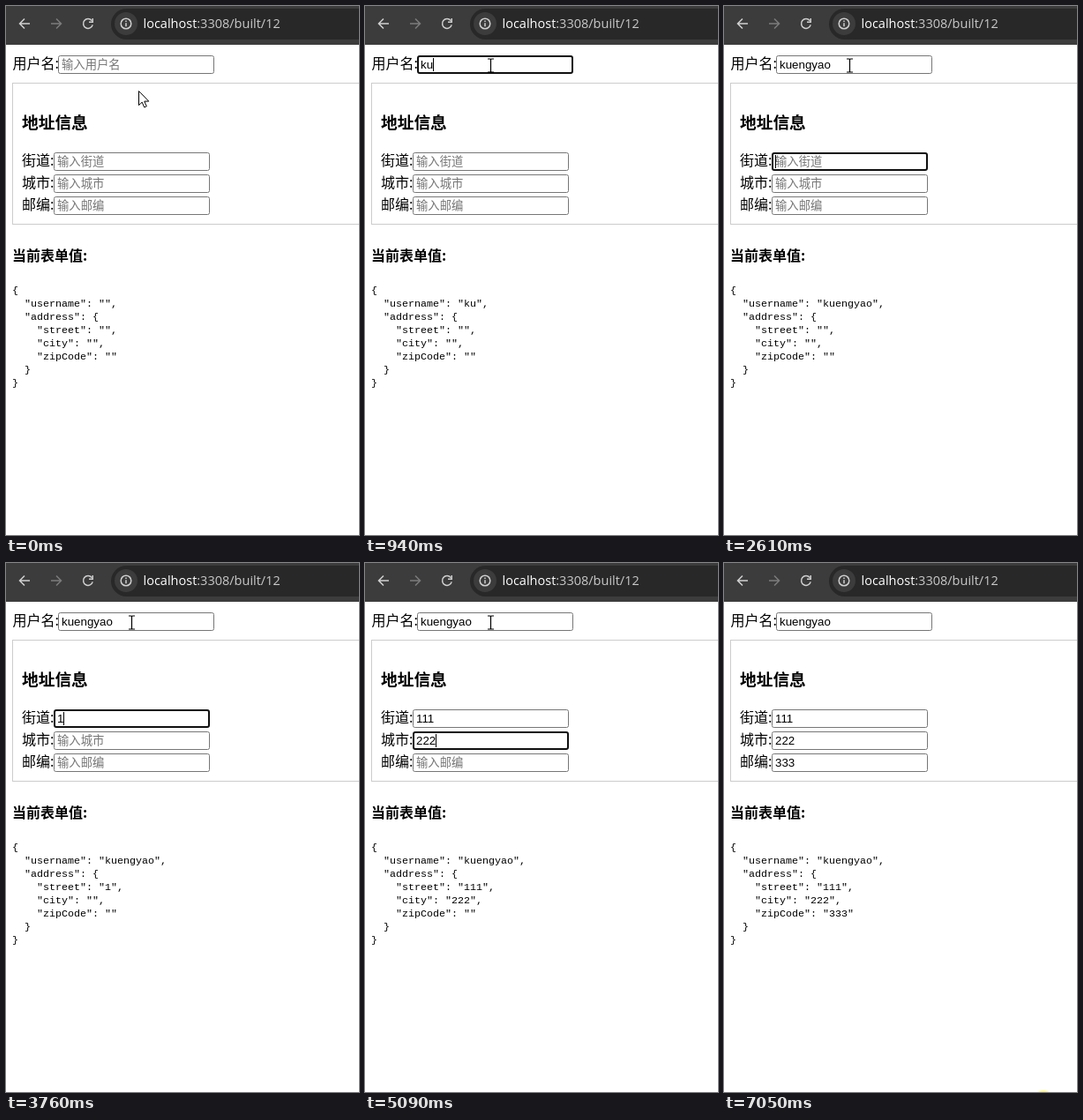
An HTML page that plays this animation: 400x600 px, repeating every 7510 ms.

```html
<!DOCTYPE html>
<html lang="zh">
<head>
<meta charset="utf-8">
<title>Form demo</title>
<style>
  html, body { margin: 0; width: 100%; height: 100%; overflow: hidden; background: #fff; }
  svg { display: block; }
  text { white-space: pre; }
  .zh { font: 16px "Noto Sans CJK SC", "Noto Sans CJK", sans-serif; }
  .bold { font-weight: 700; }
  .title { font-size: 18.72px; }
  .hint { font-size: 13.333px; fill: #757575; }
  .value { font: 13.333px "Liberation Sans", Arial, sans-serif; }
  .json { font: 11.667px "Liberation Mono", monospace; }
  .url { font: 14.5px "Open Sans", "Noto Sans", sans-serif; fill: #c9c9c9; }
  .icon { fill: none; stroke: #d0d0d0; stroke-width: 1.5; }
</style>
</head>
<body>
<svg id="stage" width="400" height="600" viewBox="0 0 400 600">
  <defs>
    <radialGradient id="glow">
      <stop offset="0" stop-color="#ffee00" stop-opacity=".75"/>
      <stop offset=".8" stop-color="#ffee00" stop-opacity=".65"/>
      <stop offset="1" stop-color="#ffee00" stop-opacity=".25"/>
    </radialGradient>
  </defs>

  <rect width="400" height="44" fill="#3c3c3c"/>
  <rect x="119" y="3" width="320" height="35" rx="17.5" fill="#282828"/>
  <circle cx="136" cy="20" r="13" fill="#3c3c3c"/>
  <g class="icon">
    <path d="M27 20H16M21 14.5L15.5 20L21 25.5"/>
    <path d="M51 20H62M57 14.5L62.5 20L57 25.5" stroke="#7c7c7c"/>
    <path d="M97.2 16.6A5.4 5.4 0 1 0 98.2 21.4M98.2 14V18.2H94"/>
    <circle cx="136" cy="20" r="5.8"/>
    <path d="M136 19.2V23.2M136 16.6V18"/>
  </g>
  <text class="url" x="155.5" y="25"><tspan fill="#fff">localhost</tspan>:3308/built/12</text>

  <rect x="7.5" y="87.5" width="500" height="160" fill="none" stroke="#ccc"/>
  <text class="zh bold title" x="18" y="139">地址信息</text>
  <text class="zh bold" x="7" y="289">当前表单值:</text>
  <g id="form"></g>
  <g id="json"></g>

  <rect id="caret" width="1" height="15"/>
  <circle id="halo" r="12.5" fill="url(#glow)"/>
  <path id="arrow" d="M.5 .5V16.6L4.2 13.1L6.7 18.9L9.3 17.8L6.8 12.1H11.8Z" fill="#fff" stroke="#000"/>
  <path id="beam" d="M-3.5 -7.5H-1Q0 -7.5 0 -6.5Q0 -7.5 1 -7.5H3.5M0 -6.5V6.5M-3.5 7.5H-1Q0 7.5 0 6.5Q0 7.5 1 7.5H3.5" fill="none" stroke="#000" stroke-width="1.2"/>
</svg>
<script>
const LOOP = 7510, BLINK = 1080, BLINK_ON = 530;
const $ = id => document.getElementById(id);

function add(parent, tag, attrs, text = '') {
  const el = document.createElementNS('http://www.w3.org/2000/svg', tag);
  for (const k in attrs) el.setAttribute(k, attrs[k]);
  el.textContent = text;
  parent.append(el);
  return el;
}

// label, label x, field x, field top, typed text, focus time, blur time, key times
const fields = [
  ['用户名', 7.5, 59, 56, 'kuengyao', 270, 2610, [740, 940, 1080, 1210, 1340, 1610, 1740, 1940]],
  ['街道', 18, 54, 166, '111', 2610, 4290, [3760, 3960, 4090]],
  ['城市', 18, 54, 191, '222', 4290, 5220, [4690, 4890, 5090]],
  ['邮编', 18, 54, 216, '333', 5220, 7050, [5560, 5760, 5970]]
].map(([label, lx, x, y, full, focus, blur, keys]) => {
  const form = $('form');
  add(form, 'text', { class: 'zh', x: lx, y: y + 15 }, label + ':');
  return {
    x, y, full, focus, blur, keys,
    box: add(form, 'rect', { fill: '#fff' }),
    hint: add(form, 'text', { class: 'zh hint', x: x + 4, y: y + 15 }, '输入' + label),
    value: add(form, 'text', { class: 'value', x: x + 4, y: y + 15 })
  };
});

const lines = Array.from({ length: 8 }, (_, i) =>
  add($('json'), 'text', { class: 'json', x: 7, y: 326 + 15 * i }));

// time, pointer shape, x, y
const pointer = [
  [0, 'arrow', 150, 96],
  [70, 'arrow', 148, 88],
  [140, 'beam', 143, 75],
  [210, 'beam', 142.5, 67.5],
  [6770, 'arrow', 350, 588],
  [6840, 'arrow', 362, 610]
];

// start, end, x, y
const clicks = [[270, 410, 142, 67], [7050, LOOP, 362, 610.4]];

const show = (el, on) => el.setAttribute('visibility', on ? 'visible' : 'hidden');
const move = (el, x, y) => el.setAttribute('transform', `translate(${x} ${y})`);

function drawField(f, t) {
  const focused = t >= f.focus && t < f.blur;
  const typed = f.keys.filter(k => k <= t);
  const text = f.full.slice(0, typed.length);
  const inset = focused ? 1 : 0.5;
  const attrs = {
    x: f.x + inset, y: f.y + inset, width: 177 - 2 * inset, height: 21 - 2 * inset,
    rx: 2, stroke: focused ? '#101010' : '#767676', 'stroke-width': 2 * inset
  };
  for (const k in attrs) f.box.setAttribute(k, attrs[k]);
  f.value.textContent = text;
  show(f.hint, !text);
  if (focused) {
    const since = t - (typed.length ? typed[typed.length - 1] : f.focus);
    const width = text ? f.value.getComputedTextLength() : 0;
    move($('caret'), Math.floor(f.x + 4 + width), f.y + 3);
    show($('caret'), since % BLINK < BLINK_ON);
  }
  return text;
}

function draw(t) {
  show($('caret'), false);
  const [username, street, city, zipCode] = fields.map(f => drawField(f, t));
  const json = JSON.stringify({ username, address: { street, city, zipCode } }, null, 2).split('\n');
  lines.forEach((el, i) => { el.textContent = json[i]; });

  const [, shape, x, y] = pointer.filter(p => p[0] <= t).pop();
  for (const id of ['arrow', 'beam']) {
    show($(id), id === shape);
    move($(id), x, y);
  }
  const click = clicks.find(c => t >= c[0] && t < c[1]);
  show($('halo'), click);
  if (click) move($('halo'), click[2], click[3]);
}

const start = performance.now();
function tick() {
  draw((performance.now() - start) % LOOP);
  requestAnimationFrame(tick);
}
tick();
</script>
</body>
</html>
```
